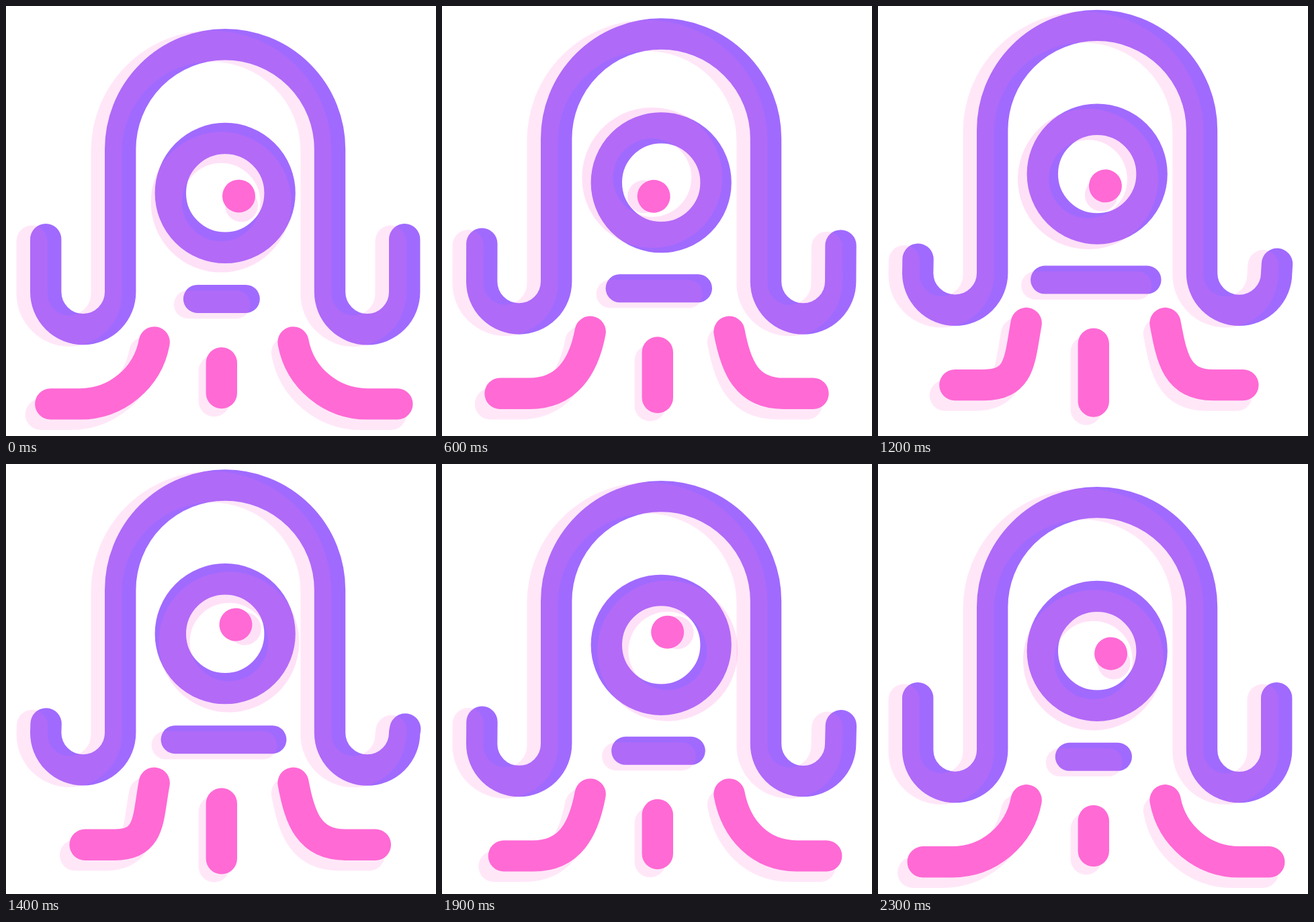
Write an HTML page with a canvas that moves like this. It is 640 px wide and 640 px high and loops after 2.4 s.

```html
<!DOCTYPE html>
<html lang="en">
<head>
<meta charset="utf-8">
<title>Octopus</title>
<style>
html, body { margin: 0; width: 100%; height: 100%; overflow: hidden; background: #fff; }
canvas { display: block; width: 640px; height: 640px; }
</style>
</head>
<body>
<canvas id="stage" width="640" height="640"></canvas>
<script>
const ctx = document.getElementById('stage').getContext('2d');
const PURPLE = '#a06aff', PINK = '#ff6ad5';
const LOOP = 2400, STEP = 100, LEAD = 40;
const THICK = 46.4;

// Sine easing from a to b between times t0 and t1, clamped at both ends.
function ease(t, t0, t1, a, b) {
  const s = Math.min(1, Math.max(0, (t - t0) / (t1 - t0)));
  return a + (b - a) * (1 - Math.cos(Math.PI * s)) / 2;
}

// Rises from 0 to 1 at the peak time and returns to 0 at the loop end.
const swell = (t, peak) => t < peak ? ease(t, 0, peak, 0, 1) : ease(t, peak, LOOP, 1, 0);

function spin(t) {
  if (t < 890) return ease(t, 140, 890, 0, 139);
  if (t < 1680) return ease(t, 890, 1680, 139, -100);
  return ease(t, 1680, LOOP, -100, 0);
}

function stroke(d, color, dx = 0, dy = 0, alpha = 1, width = THICK) {
  ctx.save();
  ctx.translate(dx, dy);
  ctx.globalAlpha = alpha;
  ctx.strokeStyle = color;
  ctx.lineWidth = width;
  ctx.stroke(new Path2D(d));
  ctx.restore();
}

function shaded(d, color, dx, dy, width) {
  stroke(d, color, 0, 0, 1, width);
  stroke(d, PINK, dx, dy, 0.16, width);
}

function dot(x, y, alpha) {
  ctx.globalAlpha = alpha;
  ctx.fillStyle = PINK;
  ctx.beginPath();
  ctx.arc(x, y, 24.5, 0, 2 * Math.PI);
  ctx.fill();
  ctx.globalAlpha = 1;
}

function ring(x, y) {
  const r = 81.4;
  return `M${x - r} ${y}a${r} ${r} 0 1 1 ${2 * r} 0a${r} ${r} 0 1 1 ${-2 * r} 0Z`;
}

function drawBody(t) {
  const k = swell(t, 1650);
  const d = `M${59.2 + 0.4 * k} ${347.2 + 67.7 * k}L59.2 425.7A55.5 55.5 0 0 0 170.2 425.7
    V213.2A155.9 155.9 0 0 1 482 213.2V425.7A55.6 55.6 0 0 0 593.2 425.7
    L${593.2 + k} ${347.2 + 76 * k}`;
  shaded(d, PURPLE, -20.5, 2.5);
}

function drawEye(t) {
  stroke(ring(326.2, 278.5), PURPLE);
  ctx.save();
  ctx.translate(324.6, 278.8);
  ctx.rotate(spin(t) * Math.PI / 180);
  ctx.translate(-324.6, -278.8);
  stroke(ring(320.2, 292), PINK, 0, 0, 0.2);
  dot(350.5, 297, 0.2);
  dot(346.5, 283, 1);
  ctx.restore();
}

function drawLegs(t, lift) {
  const a = 51.5 * swell(t, 1480), b = -42.1 * swell(t, 1000);
  shaded(`M220.7 500.5C210.8 553.8 ${164.2 + a} 592.5 ${110 + a} 592.5H${66.2 + a}`, PINK, -14.5, 15.5);
  shaded(`M427.5 500.5C437.4 553.8 ${484 + b} 592.5 ${538.2 + b} 592.5H${582.5 + b}`, PINK, -9.5, 15.5);
  shaded(`M320.8 531.2V${576 + 41 * lift}`, PINK, -11, 12);
}

function draw() {
  const now = performance.now() % LOOP;
  const t = Math.floor(now / STEP) * STEP + LEAD;
  const lift = swell(t, LOOP / 2);
  ctx.setTransform(1, 0, 0, 1, 0, 0);
  ctx.fillStyle = '#fff';
  ctx.fillRect(0, 0, 640, 640);
  ctx.lineCap = 'round';
  ctx.translate(0, -28.5 * lift);
  drawBody(t);
  drawEye(t);
  shaded(`M${285 - 37 * lift} 436H${356.7 + 44 * lift}`, PURPLE, -14, 8.3, 42);
  drawLegs(t, lift);
  requestAnimationFrame(draw);
}
draw();
</script>
</body>
</html>
```
